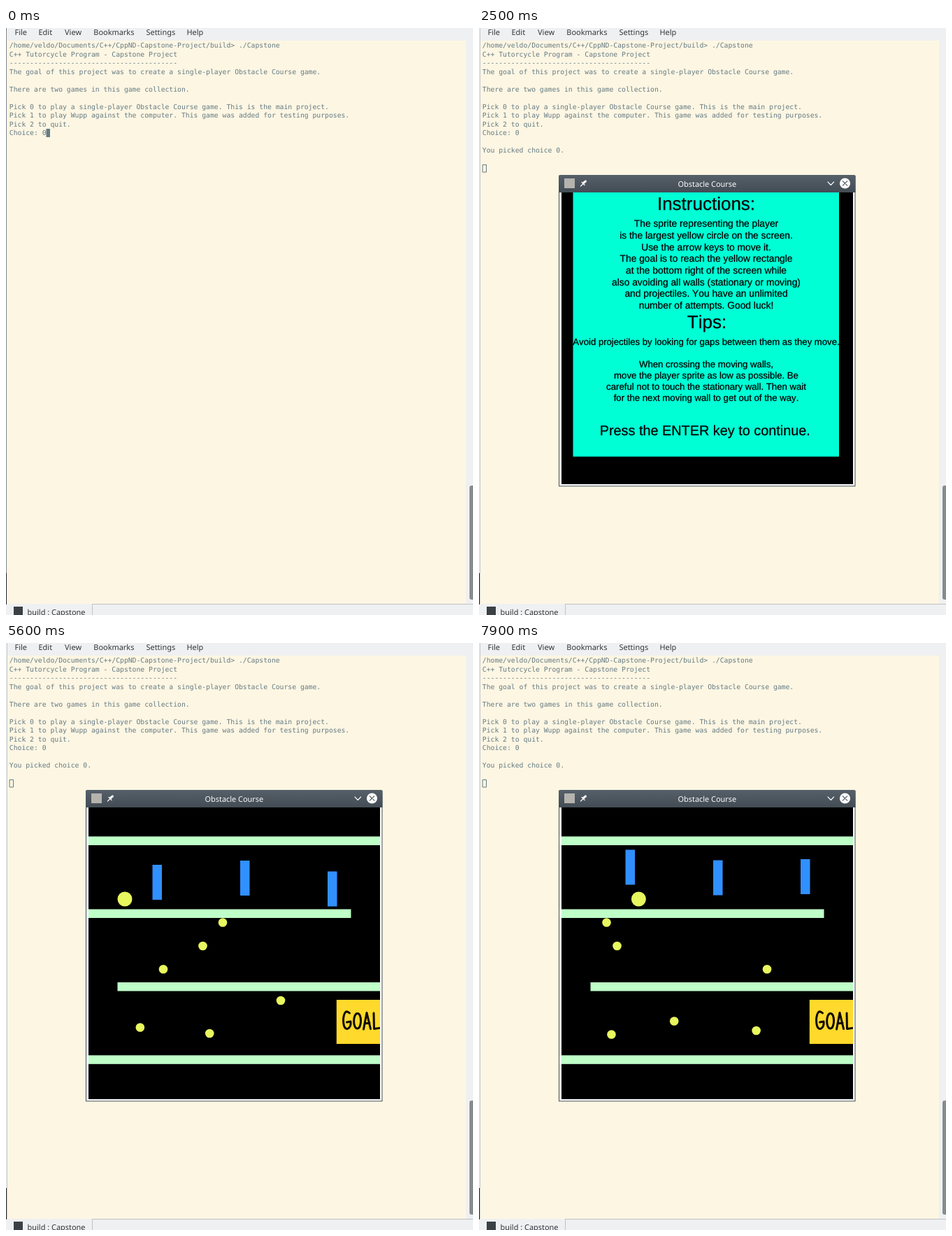
Animation of 668 by 839 pixels, one loop 8000 ms. Source, as an HTML page with a canvas:

```html
<!DOCTYPE html>
<html lang="en">
<head>
<meta charset="utf-8">
<title>Obstacle Course</title>
<style>
html, body { margin: 0; width: 100%; height: 100%; overflow: hidden; background: #eff0f1; }
canvas { display: block; }
</style>
</head>
<body>
<canvas id="stage" width="668" height="839"></canvas>
<script>
const ctx = document.getElementById('stage').getContext('2d');
ctx.textRendering = 'geometricPrecision';
ctx.fontKerning = 'none';

const LOOP = 8000, OPEN = 500, HELP = 1500, PLAY = 4500, TICK = 100;
const UI = '"Noto Sans", sans-serif';
const MONO = '"DejaVu Sans Mono", monospace';
const SANS = '"Liberation Sans", sans-serif';
const BALL = '#e8f75e', GREEN = '#bfffc8', BLUE = '#3090ff';

const rect = (x, y, w, h, color) => {
  ctx.fillStyle = color;
  ctx.fillRect(x, y, w, h);
};
const disc = (x, y, r, color) => {
  ctx.fillStyle = color;
  ctx.beginPath();
  ctx.arc(x, y, r, 0, 2 * Math.PI);
  ctx.fill();
};
const text = (str, x, y, size, family, color, align = 'left') => {
  ctx.font = `${size}px ${family}`;
  ctx.textAlign = align;
  ctx.fillStyle = color;
  ctx.fillText(str, x, y);
};
const stroke = (d, color, width) => {
  ctx.strokeStyle = color;
  ctx.lineWidth = width;
  ctx.lineCap = ctx.lineJoin = 'round';
  ctx.stroke(new Path2D(d));
};

// Linear track through [tick, value] pairs
const track = (keys, n) => {
  let i = 0;
  while (i < keys.length - 2 && n >= keys[i + 1][0]) i++;
  const [[n0, v0], [n1, v1]] = keys.slice(i, i + 2);
  return v0 + (v1 - v0) * (n - n0) / (n1 - n0);
};
// Triangle wave: a distance travelled between two bounces
const bounce = (distance, range) => {
  const d = distance % (2 * range);
  return d > range ? 2 * range - d : d;
};
const clamp = (v, lo, hi) => Math.min(hi, Math.max(lo, v));

const shell = [
  '/home/veldo/Documents/C++/CppND-Capstone-Project/build> ./Capstone',
  'C++ Tutorcycle Program - Capstone Project',
  '-'.repeat(41),
  'The goal of this project was to create a single-player Obstacle Course game.',
  '',
  'There are two games in this game collection.',
  '',
  'Pick 0 to play a single-player Obstacle Course game. This is the main project.',
  'Pick 1 to play Wupp against the computer. This game was added for testing purposes.',
  'Pick 2 to quit.',
  'Choice: 0'
];
const menu = [['File', 12.5], ['Edit', 46.5], ['View', 84], ['Bookmarks', 125.3], ['Settings', 200.5], ['Help', 258.5]];

function drawTerminal(t) {
  const opened = t >= OPEN;
  rect(0, 0, 668, 839, '#eff0f1');
  rect(2, 18, 656, 805, '#fdf6e3');
  menu.forEach(([label, x]) => text(label, x, 9.6, 10.95, UI, '#31363b'));

  const line = (str, row) => text(str, 4.8, 28.2 + 12.52 * row, 9.745, MONO, '#657b83');
  shell.forEach(line);
  if (opened) {
    line('You picked choice 0.', 12);
    ctx.strokeStyle = '#657b83';
    ctx.lineWidth = 1;
    ctx.strokeRect(5.5, 195.5, 5, 10.5);
  } else {
    rect(57.5, 144, 5.5, 12, '#657b83');
  }

  rect(opened ? 1 : 0, 0, 1, 823, opened ? '#c4c8cb' : '#83888b');
  if (t < 2400 || t >= 2500) rect(0, 779, 1, 45, '#25282b');

  ctx.fillStyle = '#868c8b';
  ctx.beginPath();
  ctx.roundRect(663, 654, 8, 163, 3);
  ctx.fill();

  rect(123, 823, 545, 1, '#bfc1c2');
  rect(123, 823, 1, 16, '#bfc1c2');
  rect(11, 827, 13, 12, '#3b4045');
  text('build : Capstone', 30.5, 838.6, 10.95, UI, '#31363b');
}

function drawWindow() {
  rect(114, 211, 424.5, 444.3, '#475057');
  rect(115, 235, 422.5, 419.3, '#fcfcfc');
  const bar = ctx.createLinearGradient(0, 210, 0, 235);
  bar.addColorStop(0, '#566069');
  bar.addColorStop(1, '#434c54');
  ctx.fillStyle = bar;
  ctx.beginPath();
  ctx.roundRect(114, 210, 424.5, 25, [2, 2, 0, 0]);
  ctx.fill();
  rect(122, 215, 15, 14, '#b5b3ae');
  stroke('M145.5 226 L148.5 223 M147 220.5 L151 224.5', '#fcfcfc', 1.2);
  stroke('M149.5 221.5 L152.5 219', '#fcfcfc', 3);
  text('Obstacle Course', 326.3, 226.5, 10.9, UI, '#fcfcfc', 'center');
  stroke('M499 220 L503.3 224.5 L507.6 220', '#fcfcfc', 1.1);
  disc(523.5, 222, 7.6, '#fcfcfc');
  stroke('M520.3 218.8 l6.4 6.4 m0 -6.4 l-6.4 6.4', '#475057', 1.1);
  rect(118, 235, 417, 417, '#000');
}

const rules = [
  'The sprite representing the player',
  'is the largest yellow circle on the screen.',
  'Use the arrow keys to move it.',
  'The goal is to reach the yellow rectangle',
  'at the bottom right of the screen while',
  'also avoiding all walls (stationary or moving)',
  'and projectiles. You have an unlimited',
  'number of attempts. Good luck!'
];
const tips = [
  'When crossing the moving walls,',
  'move the player sprite as low as possible. Be',
  'careful not to touch the stationary wall. Then wait',
  'for the next moving wall to get out of the way.'
];

function drawHelp() {
  rect(134.5, 235, 380.5, 377.6, '#00ffd5');
  // A hairline outline gives the text its slightly heavy weight
  const centred = (str, y, size, x = 325) => {
    text(str, x, y, size, SANS, '#000', 'center');
    ctx.strokeStyle = '#000';
    ctx.lineWidth = 0.25;
    ctx.strokeText(str, x, y);
  };
  centred('Instructions:', 260, 26);
  rules.forEach((str, i) => centred(str, 284.2 + 16.7 * i, 13.8));
  centred('Tips:', 429.3, 26, 326);
  centred('Avoid projectiles by looking for gaps between them as they move.', 453, 13.15);
  tips.forEach((str, i) => centred(str, 484.8 + 15.9 * i, 13.2));
  centred('Press the ENTER key to continue.', 582, 19.85, 323.2);
}

const stops = [0, 11, 21, 34];
const keyed = values => values.map((v, i) => [stops[i], v]);

// Moving walls: x and distance travelled
const walls = [
  [209.5, keyed([0, 29, 57, 92.5])],
  [335, keyed([21, 62, 97.5, 147.5])],
  [460, keyed([73, 123.5, 171, 234])]
];
// Balls crossing the corridor: y and x track
const crossers = [
  [399.5, [[0, 153], [11, 310], [21, 460.5], [23, 490], [24, 125], [34, 182.5]]],
  [433, [[0, 149], [11, 281.5], [21, 408.5], [27, 488], [28, 124.5], [34, 197.5]]],
  [466.3, keyed([140, 225, 306, 412])]
];
// Balls bouncing on a slanted line: x at mid height, slant, distance travelled
const bouncers = [
  [191, -0.24, keyed([104.5, 200.5, 293.5, 409.5])],
  [287.8, 0.69, keyed([61.5, 101, 142, 191.5])],
  [396.5, 0.083, keyed([48, 148, 237, 360])]
];

function drawGame(n) {
  rect(118, 276.5, 417, 12.5, GREEN);
  rect(118, 380.5, 375.5, 12.5, GREEN);
  rect(159.5, 485, 375.5, 12.5, GREEN);
  rect(118, 589.3, 417, 12.5, GREEN);

  rect(472.8, 510, 62.2, 63, '#ffd92b');
  ctx.save();
  ctx.beginPath();
  ctx.rect(472.8, 510, 62.2, 63);
  ctx.clip();
  stroke('M491.5 529 Q484 522 482.5 538 Q482.5 552 488.5 551.5 Q494 549 493 541 L487.5 542', '#100c00', 3);
  stroke('M502.5 529.5 C509.5 529 509 551 502.5 551 C496 551 496 530 502.5 529.5', '#100c00', 3);
  stroke('M511.5 552 L516 528.5 L521.5 551.5 M513 544 L520 543', '#100c00', 3);
  stroke('M526 529 L526.5 551.5 L536 550', '#100c00', 3);
  ctx.restore();

  walls.forEach(([x, travel]) => {
    const y = 288 + bounce(track(travel, n), 42.5);
    rect(x, y - 1, 13.5, 1, '#000');
    rect(x, y, 13.5, 50, BLUE);
  });
  crossers.forEach(([y, path]) => disc(track(path, n), y, 6.3, BALL));
  bouncers.forEach(([x, slant, travel]) => {
    const y = 504 + bounce(track(travel, n), 77.5);
    disc(x + slant * (y - 553), y, 6.3, BALL);
  });

  // The player moves one fixed step per key press
  const step = 8.34, right = clamp(n - 27, 0, 7), down = clamp(n - 8, 0, 2);
  disc(170 + step * right, 349.3 + step * down, 10.5, BALL);
}

function frame() {
  const t = performance.now() % LOOP;
  drawTerminal(t);
  if (t >= OPEN) drawWindow();
  if (t >= PLAY) drawGame(Math.floor((t - PLAY) / TICK));
  else if (t >= HELP) drawHelp();
  requestAnimationFrame(frame);
}
frame();
</script>
</body>
</html>
```
